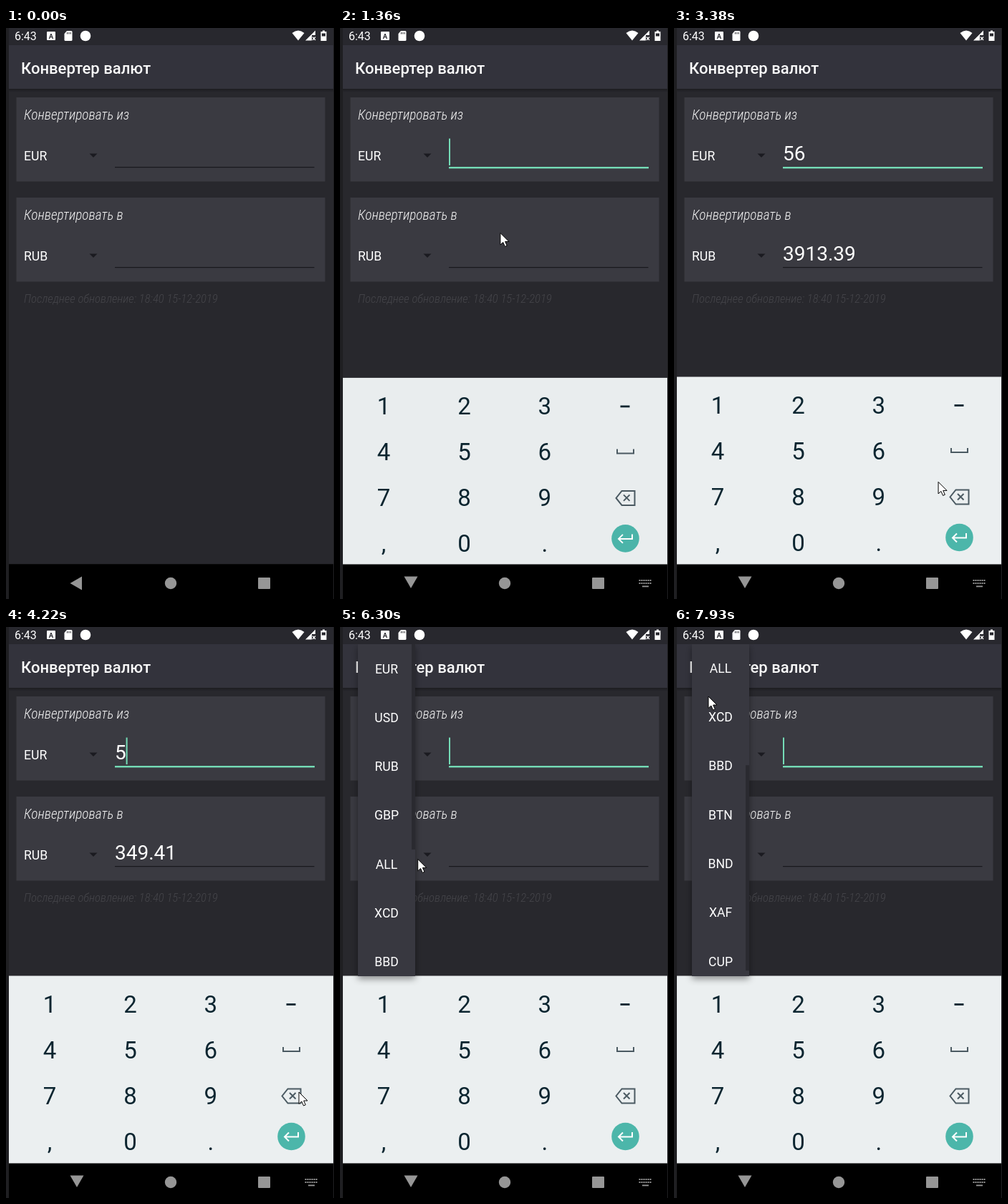
Write an HTML page that moves like this. It is 458x798 px and loops after 8 s.

```html
<!DOCTYPE html>
<html lang="ru">
<head>
<meta charset="utf-8">
<title>Конвертер валют</title>
<style>
  html, body { margin: 0; width: 100%; height: 100%; overflow: hidden; background: #1f1f22; }
  svg { display: block; width: 100%; height: 100%; font-family: Roboto, sans-serif; }
  .label { font: italic 300 19.4px 'Roboto Condensed', Roboto, sans-serif; fill: #f2f2f2; }
  .note { font: italic 300 16.7px 'Roboto Condensed', Roboto, sans-serif; fill: #45454a; }
  .code { font-size: 17.6px; fill: #fff; }
  .value { font-size: 28px; fill: #fff; }
  .key { font-size: 33px; fill: #0b2530; text-anchor: middle; }
  .line { fill: none; stroke: #4b5a62; stroke-width: 2; }
</style>
</head>
<body>
<svg viewBox="0 0 458 798">
  <defs>
    <filter id="shade" x="-40%" y="-10%" width="180%" height="120%">
      <feDropShadow dx="0" dy="4" stdDeviation="5" flood-color="#000" flood-opacity=".4"/>
    </filter>
    <linearGradient id="fade" x2="0" y2="1">
      <stop stop-color="#1d1d21"/><stop offset="1" stop-color="#28282d"/>
    </linearGradient>
    <clipPath id="view"><rect x="25" y="24" width="80" height="464"/></clipPath>
    <clipPath id="screen"><rect x="4" width="453" height="798"/></clipPath>
  </defs>

  <g clip-path="url(#screen)">
    <rect x="4" width="453" height="798" fill="#28282d"/>
    <rect x="4" y="24" width="453" height="61" fill="#33333c"/>
    <rect x="4" y="85" width="453" height="5" fill="url(#fade)"/>
    <text x="21" y="64" font-size="22" font-weight="500" fill="#fafafa">Конвертер валют</text>
    <g id="cards"></g>
    <g id="note"></g>
    <rect id="focus" x="152" y="194" width="279" height="2.400" fill="#74dcb6"/>
    <rect id="caret" y="154.500" width="2" height="37.500" fill="#74dcb6"/>
    <text id="input" class="value" x="152" y="185"></text>
    <text id="output" class="value" x="152" y="325"></text>

    <rect x="4" y="749.500" width="453" height="49" fill="#000"/>
    <g id="board">
      <rect x="4" y="487.500" width="453" height="313" fill="#ebeff0"/>
      <rect id="press" width="112" height="64" fill="#dbe0e1"/>
      <g id="keys"></g>
      <path d="M391.500 527.500h13" class="line" style="stroke:#0b2530;stroke-width:2.800"/>
      <path d="M387 587v6h23v-6" class="line"/>
      <path d="M393.500 645.500h18v20h-18l-8-10zM396 651l8.500 8.500m0-8.500l-8.500 8.500" class="line"/>
      <circle cx="398.500" cy="712" r="19.300" fill="#4cb6aa"/>
      <path d="M408 706v6.500h-18.500m5.500-6l-6 6 6 6" class="line" style="stroke:#fff"/>
    </g>
    <rect id="nav" x="4" y="749.500" width="453" height="49" fill="#000"/>
    <g id="icons">
      <path id="back" d="M8-9.500V9.500L-8.500 0z"/>
      <circle cx="230" cy="776" r="8.200"/>
      <rect x="352" y="768" width="17" height="16" rx="1"/>
      <g id="dots"></g>
    </g>

    <g id="popup">
      <rect x="25" y="24" width="80" height="464" fill="#38383f" filter="url(#shade)"/>
      <g clip-path="url(#view)">
        <g id="list"></g>
        <rect id="thumb" x="100" width="5" height="287" fill="#2a2a30"/>
      </g>
    </g>

    <rect x="4" width="453" height="24" fill="#28282e"/>
    <g fill="#fff">
      <text x="12" y="17" font-size="16">6:43</text>
      <rect x="57" y="5" width="12" height="12" rx="1"/>
      <text x="63" y="14.500" font-size="9.500" font-weight="700" text-anchor="middle" fill="#28282e">A</text>
      <path d="M85 4h6q1.500 0 1.500 1.500v11q0 1.500-1.500 1.500h-8q-1.500 0-1.500-1.500V8z"/>
      <path d="M85.500 6v2.500m2.300-2.500v2.500m2.300-2.500v2.500" stroke="#28282e"/>
      <circle cx="111" cy="11" r="7.300"/>
      <path d="M408 17.500L399.500 7q8.500-7 17 0z"/>
      <path d="M418 17.500L432 3.500V10h-5v7.500z"/>
      <path d="M428 12.500l4 4.500m0-4.500l-4 4.500" stroke="#fff" stroke-width="1.300"/>
      <path d="M442 3.500h3V5h2.500v13h-8V5h2.500z"/>
      <path d="M441 7.500h5v4h-5z" fill="#28282e"/>
    </g>
  </g>

  <g id="mouse">
    <path d="M0 0V16.500L3.800 13 6.500 19 9.300 17.800 6.700 12H12z" fill="#fff" stroke="#000"/>
    <circle id="click" cx="-.5" cy="-.5" r="15" fill="#fffc00" fill-opacity=".47"/>
  </g>
</svg>
<script>
const $ = id => document.getElementById(id);
const set = (id, attrs) => { for (const k in attrs) $(id).setAttribute(k, attrs[k]); };
const show = (id, on) => set(id, { visibility: on ? 'visible' : 'hidden' });
const ramp = (t, a, b) => Math.min(1, Math.max(0, (t - a) / (b - a)));
const ease = (t, a, b) => { const u = ramp(t, a, b); return u * u * (3 - 2 * u); };
const repeat = (n, f) => Array.from({ length: n }, (_, i) => f(i)).join('');

// Condense plain Roboto when its condensed family is missing
const pen = document.createElement('canvas').getContext('2d');
const measure = font => {
  pen.font = `italic 300 100px ${font}`;
  return pen.measureText('Конвертировать').width;
};
const narrow = measure("'Roboto Condensed', Roboto, sans-serif") < measure('Roboto, sans-serif') * .95;
const slim = (cls, y, text) =>
  `<text class="${cls}" transform="translate(25 ${y}) scale(${narrow ? 1 : .84} 1)">${text}</text>`;

const card = (y, label, code) => `
  <rect x="14.500" y="${y}" width="431" height="117.500" fill="#3a3a41"/>
  ${slim('label', y + 31, label)}
  <text class="code" x="25" y="${y + 87.5}">${code}</text>
  <path d="M116.500 ${y + 78.5}h11l-5.500 5.500z" fill="#1a1a20"/>
  <rect x="152" y="${y + 97}" width="278.500" height="1.200" fill="#18181d"/>`;
$('cards').innerHTML = card(97, 'Конвертировать из', 'EUR') + card(237, 'Конвертировать в', 'RUB');
$('note').innerHTML = slim('note', 384, 'Последнее обновление: 18:40 15-12-2019');

// Keyboard, four keys per row; "<" deletes, the rest of the last column is icons
const KEYS = '123-456_789<,0.';
$('keys').innerHTML = repeat(KEYS.length, i => i % 4 === 3 ? '' :
  `<text class="key" x="${61 + i % 4 * 112.4}" y="${539 + (i >> 2) * 64}">${KEYS[i]}</text>`);
$('dots').innerHTML = '<rect x="422" y="779.500" width="9" height="1.800"/>' + repeat(12, i =>
  `<rect x="${417.5 + i % 6 * 3}" y="${771 + Math.floor(i / 6) * 4}" width="2" height="2"/>`);

const ROW = 68.3;
const codes = 'EUR USD RUB GBP ALL XCD BBD BTN BND XAF CUP'.split(' ');
$('list').innerHTML = repeat(codes.length, i =>
  `<text class="code" text-anchor="middle" x="65" y="${64.5 + i * ROW}">${codes[i]}</text>`);

const RATE = 69.882, TAP = 145, LAG = 70;
const FOCUS = 980, OPEN = 1055, LIST = 5840, DRAG = 6866;
const typed = [[1950, '5'], [2455, '6'], [3880, '<'], [4440, '<']];
const taps = [FOCUS - LAG, ...typed.map(k => k[0]), 5515];

// Pointer moves: leave, arrive, x, y
const moves = [
  [210, 850, 243, 182], [1130, 1830, 168, 592], [2060, 2290, 263, 593], [2620, 3780, 409, 650],
  [4850, 5500, 112, 315], [6160, 6820, 84, 395], [DRAG, 7900, 63, 57], [7900, 7925, 48, 97]
];

function pointer(t) {
  let x = 250, y = 778;
  for (const [from, to, tx, ty] of moves) {
    const k = ease(t, from, to);
    x += (tx - x) * k;
    y += (ty - y) * k;
  }
  return [x, y];
}

function drawFields(t) {
  let text = '', since = FOCUS;
  for (const [at, key] of typed) {
    if (t < at + LAG) break;
    text = key === '<' ? text.slice(0, -1) : text + key;
    since = at + LAG;
  }
  $('input').textContent = text;
  $('output').textContent = text && (text * RATE).toFixed(2);
  show('focus', t >= FOCUS);
  show('caret', t >= FOCUS && (t >= LIST || (t - since) % 1000 < 500));
  set('caret', { x: 152 + text.length * 15.6 });
}

function drawKeyboard(t) {
  const open = t >= OPEN;
  const rest = Math.exp(-Math.max(0, t - OPEN - 65) / 60);
  const dark = open ? ramp(t, OPEN + 75, OPEN + 235) : 1;
  show('board', open);
  show('dots', open);
  set('board', { transform: `translate(0 ${78 * rest})`, opacity: 1 - .52 * rest });
  set('nav', { opacity: dark });
  const grey = 196 - 46 * dark;
  set('icons', { fill: `rgb(${grey},${grey},${grey})` });
  set('back', { transform: open
    ? `translate(${101 - 2 * dark} 774.5) rotate(${180 + 90 * dark})`
    : 'translate(98 776)' });
  const hit = typed.find(([at]) => t >= at && t < at + TAP);
  show('press', hit);
  if (hit) {
    const i = KEYS.indexOf(hit[1]);
    set('press', { x: 6 + i % 4 * 112, y: 494 + (i >> 2) * 64 });
  }
}

function drawList(t) {
  const scroll = 274 * ease(t, DRAG, 7930);
  show('popup', t >= LIST);
  set('popup', { opacity: ramp(t, LIST - 40, LIST + 220) });
  set('list', { transform: `translate(0 ${-scroll})` });
  set('thumb', { y: 24 + scroll * 464 / (codes.length * ROW) });
}

function drawPointer(t) {
  const down = taps.some(at => t >= at && t < at + TAP) || (t >= DRAG && t < 7920);
  show('mouse', t >= 210);
  set('mouse', { transform: `translate(${pointer(t)})` });
  set('click', { display: down ? 'inline' : 'none' });
}

function loop() {
  const t = performance.now() % 8000;
  [drawFields, drawKeyboard, drawList, drawPointer].forEach(draw => draw(t));
  requestAnimationFrame(loop);
}
loop();
</script>
</body>
</html>
```
